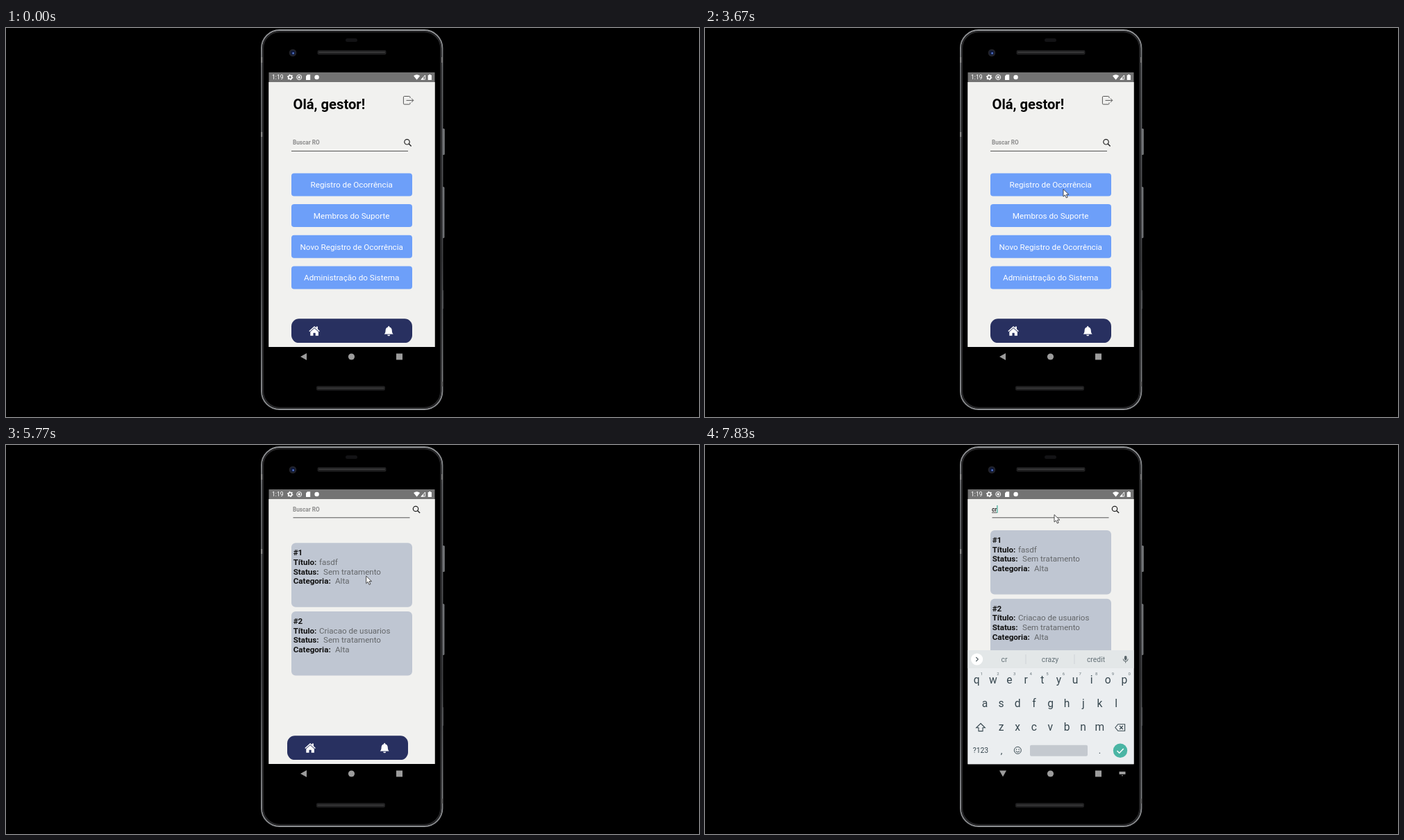
These frames come from a looping animation (998 px wide and 561 px high, 8000 ms). An HTML page:

```html
<!DOCTYPE html>
<html lang="pt">
<head>
<meta charset="utf-8">
<title>App</title>
<style>
html, body { margin: 0; width: 100%; height: 100%; overflow: hidden; background: #000; }
svg { display: block; width: 100%; height: 100%; font-family: Roboto, sans-serif; }
</style>
</head>
<body>
<svg id="stage" viewBox="0 0 998 561"></svg>
<script>
const LOOP = 8000;
const stage = document.getElementById('stage');

const rect = (x, y, w, h, fill, r = 0, more = '') =>
  `<rect x="${x}" y="${y}" width="${w}" height="${h}" rx="${r}" fill="${fill}" ${more}/>`;
const circle = (x, y, r, fill, more = '') => `<circle cx="${x}" cy="${y}" r="${r}" fill="${fill}" ${more}/>`;
const path = (d, fill, more = '') => `<path d="${d}" fill="${fill}" ${more}/>`;
const line = (d, color, w = 1, more = '') =>
  `<path d="${d}" fill="none" stroke="${color}" stroke-width="${w}" ${more}/>`;
const text = (x, y, size, fill, s, more = '') =>
  `<text x="${x}" y="${y}" font-size="${size}" fill="${fill}" ${more}>${s}</text>`;
const group = (id, body, more = '') => `<g id="${id}" ${more}>${body}</g>`;
const MID = 'text-anchor="middle"';
const BOLD = 'font-weight="700"';

const search = (x, y) => circle(x - 1, y - 1, 3.7, 'none', 'stroke="#222" stroke-width="1.2"') +
  line(`M${x + 1.7} ${y + 1.7}l3.4 3.4`, '#222', 1.4);

const tabBar = x => rect(x, 419.3, 174, 34.8, '#283060', 11) +
  path(`M${x + 25.3} 437l7.8-7 2.6 2.3v-1.7h2.2v3.7l3 2.7-1 1-6.8-6-6.8 6z
    M${x + 27.3} 438.2l5.8-5.1 5.8 5.1v5.6h-4.2v-4.1h-3.2v4.1h-4.2z`, '#fff') +
  path(`M${x + 133.7} 441.5c1.8-1.8 1.7-3.2 1.9-5.6 .2-2.6 1.7-4.2 3.7-4.6v-.7a.9.9 0 0 1 1.8 0v.7
    c2 .4 3.5 2 3.7 4.6 .2 2.4 .1 3.8 1.9 5.6zM${x + 138.2} 442.5h4a2 1.8 0 0 1-4 0z`, '#fff');

const speaker = (x, y) => rect(x, y, 99, 6.4, '#1f1f20', 2) + rect(x + 1.5, y + 2.1, 96, 2, '#363637', 1);

function phone() {
  return rect(628, 145, 3.8, 38, '#77797c', 1.5) + rect(628, 229, 3.4, 74, '#77797c', 1.5) +
    rect(627.5, 378, 2.6, 27, '#3a3b3d', 1) +
    rect(368, 3, 260.4, 547, '#000', 26, 'stroke="url(#rim)" stroke-width="2"') +
    rect(370.2, 5.2, 256, 542.6, 'none', 24, 'stroke="#28282a" stroke-width="2"') +
    rect(367, 42, 2.2, 8, '#888') + rect(367, 150, 2.2, 7, '#888') +
    rect(627, 42, 2, 8, '#777') + rect(627, 510, 2, 7, '#555') +
    rect(489, 15, 17, 5, '#131315', 2.5) + speaker(448.5, 32) + speaker(447, 516.3) +
    circle(413, 35.7, 5.3, '#22232a') + circle(413, 35.7, 3.2, '#101a3c') + circle(413.6, 36.4, 1.3, '#5577d0');
}

function statusBar() {
  return rect(378.5, 64, 239, 14, '#737373') +
    text(383, 74.2, 8.6, '#fff', '1:19') +
    circle(409.2, 71, 2.5, 'none', 'stroke="#fff" stroke-width="1.7"') +
    circle(409.2, 71, 3.7, 'none', 'stroke="#fff" stroke-width="1.1" stroke-dasharray="1.6 2.27"') +
    circle(422.2, 71, 3.5, 'none', 'stroke="#fff" stroke-width="1"') + circle(422.2, 71, 1.7, '#fff') +
    path('M432 69.3l2-2h4.2v7.6H432z', '#fff') + circle(447.6, 71, 3.2, '#fff') +
    path('M587 69q4.6-3.6 9.2 0l-4.6 5.7z', '#fff') +
    line('M597.8 74.2h5.8v-6.2z', '#fff', .9) + path('M597.6 74.4l3.8-4v4z', '#fff') +
    path('M607.7 68h1.4v-.9h2.4v.9h1.4v6.9h-5.2z', '#fff');
}

function home() {
  const labels = ['Registro de Ocorrência', 'Membros do Suporte', 'Novo Registro de Ocorrência', 'Administração do Sistema'];
  return rect(378, 78, 240, 382, '#f1f1ef') +
    text(413.5, 117, 20.2, '#050505', 'Olá, gestor!', BOLD) +
    line('M582 101v-1.2q0-1.3-1.3-1.3h-7q-1.3 0-1.3 1.3v9q0 1.3 1.3 1.3h7q1.3 0 1.3-1.3v-1.2M576.5 104.4h10M584 101.6l2.8 2.8-2.8 2.8', '#555', 1) +
    text(413, 168, 8.2, '#8c8c8c', 'Buscar RO', BOLD) + search(578.5, 165.3) +
    line('M411 177.5h168', '#555') +
    labels.map((s, i) => group('btn' + i, rect(411, 209.4 + i * 44.7, 174, 33, '#6d9ff9', 4) +
      text(497.7, 230.2 + i * 44.7, 11.7, '#fff', s, MID))).join('') +
    tabBar(411);
}

function card(y, id, title) {
  const rows = [['Título:', title, 451], ['Status:', 'Sem tratamento', 457], ['Categoria:', 'Alta', 474]];
  return rect(411, y, 174, 92.5, '#bfc6d2', 6) +
    text(413.7, y + 18, 11.6, '#111', id, BOLD) +
    rows.map(([k, v, x], i) => text(413.7, y + 31.7 + i * 13.7, 11.6, '#111', k, BOLD) +
      text(x, y + 31.7 + i * 13.7, 11.6, '#636669', v)).join('');
}

function list() {
  return rect(378, 78, 240, 382, '#f1f1ef') +
    group('hint', text(413, 95.8, 8.2, '#8c8c8c', 'Buscar RO', BOLD)) +
    text(413, 95.8, 8.2, '#333', '', `${BOLD} id="typed"`) +
    rect(413, 97.3, 8, .8, '#333', 0, 'id="under"') +
    rect(413, 87, 1, 11, '#1a9c86', 0, 'id="caret"') +
    search(591, 93) + line('M413.5 104.8h168', '#555') +
    group('cards', card(141.2, '#1', 'fasdf') + card(240, '#2', 'Criacao de usuarios')) +
    group('listTabs', tabBar(405));
}

function keyboard() {
  const ink = '#37474f', step = 23.63;
  const rows = [['qwertyuiop', 391.2, 344], ['asdfghjkl', 403, 378], ['zxcvbnm', 426.5, 412]];
  const keys = upper => rows.map(([s, x, y]) => [...s].map((c, i) =>
    text(x + i * step, y, 15.6, ink, upper ? c.toUpperCase() : c, MID)).join('')).join('');
  const digits = [...'1234567890'].map((d, i) => text(398.4 + i * step, 332, 6, '#68757b', d, MID)).join('');
  const arrow = 'M397 401.5l6.3 6.3h-3.3v4.8h-6v-4.8h-3.3z';
  const words = [431, 497, 563].map((x, i) => text(x, 313, 10.4, '#647177', '', `${MID} id="word${i}"`)).join('');
  return rect(378, 296, 240, 164.5, '#ebeef0') + rect(378, 296, 240, 26, '#e3e7e8') +
    circle(391.6, 309, 8.6, '#fff') + line('M390.3 306l3 3-3 3', '#5a666b', 1.2) +
    group('words', words + line('M462 302v14M532 302v14', '#cbd0d3', .8)) +
    rect(603.9, 304, 3.6, 6.4, '#5a666b', 1.8) + line('M602.2 308.5a3.5 3.5 0 0 0 7 0M605.7 312v2.4', '#5a666b', 1) +
    digits + group('upper', keys(true) + path(arrow, ink)) +
    group('lower', keys(false) + line(arrow, ink, 1.1)) +
    line('M590.8 407.5l4-4.8h9.8v9.6h-9.8zM597 405l5 5m0-5l-5 5', ink, 1.1) +
    text(397, 444.3, 10.4, ink, '?123', MID) + text(427, 445, 13, ink, ',', MID) + text(568.5, 445, 13, ink, '.', MID) +
    circle(450.3, 440.3, 5, 'none', `stroke="${ink}" stroke-width="1"`) +
    circle(448.5, 439, .8, ink) + circle(452.1, 439, .8, ink) + line('M447.5 441.5q2.8 3 5.6 0', ink, 1) +
    rect(468, 432.7, 83, 16, '#c4c9cf', 2) +
    circle(598, 440.8, 10.2, '#4ab5a4') + line('M593.5 441l3.2 3.2 6-6.2', '#fff', 1.5);
}

function navIcons() {
  const c = 'inherit';
  return group('nav', group('back', path('M424 474l9-5v10z', c)) + group('hide', path('M424 469.5h10l-5 9z', c)) +
    circle(497.5, 474, 4.6, c) + rect(562, 469.5, 9, 9, c) +
    group('kbIcon', rect(596.5, 471, 9, 4, c, .5) + path('M599.5 476.2h3l-1.5 1.5z', c)));
}

stage.innerHTML = `<defs>
  <linearGradient id="rim" x1="0" y1="0" x2="0" y2="1">
    <stop offset="0" stop-color="#97999c"/><stop offset=".1" stop-color="#66686b"/>
    <stop offset=".6" stop-color="#434447"/><stop offset="1" stop-color="#8c8e91"/>
  </linearGradient>
  <clipPath id="view"><rect x="378.5" y="78" width="239" height="382" id="viewRect"/></clipPath>
  <clipPath id="full"><rect x="378.5" y="78" width="239" height="410"/></clipPath></defs>` +
  rect(0, 0, 998, 561, '#000') + phone() +
  rect(378.5, 78, 239, 382, '#f9f9f9') +
  `<g clip-path="url(#view)">${group('home', home())}${group('list', list())}</g>` +
  statusBar() +
  `<g clip-path="url(#full)">${group('keyboard', keyboard())}${rect(378, 460, 240, 28, '#000', 0, 'opacity=".2"')}</g>` +
  navIcons() +
  group('cursor', path('M0 0v10.6l2.5-2.3 1.8 4.1 1.9-.8-1.8-4h3.4z', '#fff', 'stroke="#222" stroke-width=".8"'));

const el = {};
stage.querySelectorAll('[id]').forEach(n => el[n.id] = n);

const clamp = v => Math.min(1, Math.max(0, v));
const span = (t, a, b) => clamp((t - a) / (b - a));
const set = (n, k, v) => el[n].setAttribute(k, v);
const show = (n, on) => set(n, 'display', on ? 'inline' : 'none');
const zoom = s => `translate(498 268) scale(${s}) translate(-498 -268)`;

// time, x, y of the pointer tip
const track = [[400, 640, 318], [970, 566, 254], [1530, 545, 234], [1770, 545, 234], [2230, 538, 231],
  [2530, 526, 235], [2600, 526, 235], [2930, 516, 232.5], [4700, 516, 232.5], [5430, 522, 152], [5530, 521.5, 151.5],
  [5670, 521.5, 151.5], [5770, 518.7, 189], [5920, 517, 212], [6470, 503.5, 101], [6530, 503, 100.5], [LOOP, 503, 100.5]];

function pointer(t) {
  const i = Math.max(1, track.findIndex(p => p[0] > t));
  const [a, b] = [track[i - 1], track[i]];
  const u = span(t, a[0], b[0]), e = u * u * (3 - 2 * u);
  return [a[1] + (b[1] - a[1]) * e, a[2] + (b[2] - a[2]) * e];
}

function draw(t) {
  show('cursor', t >= track[0][0]);
  set('cursor', 'transform', `translate(${pointer(t)})`);

  // press, then the list fades in over the growing home screen
  set('btn0', 'opacity', 1 - .15 * span(t, 3680, 3730));
  const grow = 1 - (1 - span(t, 3870, 4270)) ** 4;
  const fade = span(t, 3880, 4320);
  set('home', 'transform', zoom(1 + .15 * grow));
  set('list', 'transform', zoom(.85 + .15 * grow));
  set('list', 'opacity', fade);
  show('home', fade < 1);
  show('list', fade > 0);

  // keyboard slides up while it fades in
  const open = t >= 6840, rise = span(t, 6840, 7030);
  const slide = 62 * (1 - rise);
  show('keyboard', open);
  set('keyboard', 'transform', `translate(0 ${slide})`);
  set('keyboard', 'opacity', clamp(.4 + rise * .6));
  set('viewRect', 'height', open ? 218 : 382);
  show('listTabs', !open);
  set('cards', 'transform', `translate(0 ${t >= 7000 ? -18.2 : 0})`);
  set('nav', 'fill', open && rise < 1 ? '#dcdcdc' : '#9c9c9c');
  show('back', t < 7000);
  show('hide', t >= 7000);
  show('kbIcon', open);
  set('kbIcon', 'opacity', rise);

  // typing
  const typed = 'cr'.slice(0, (t >= 7370) + (t >= 7560));
  const n = typed.length;
  const words = [['', '', ''], ['c', 'can', 'call'], ['cr', 'crazy', 'credit']][n];
  const width = [0, 4.3, 7.4][n];
  el.typed.textContent = typed;
  words.forEach((w, i) => el['word' + i].textContent = w);
  show('hint', !n);
  show('words', n);
  show('upper', !n);
  show('lower', n);
  set('under', 'width', width);
  show('caret', t >= 6730);
  set('caret', 'x', 413 + width);
}

function tick() {
  draw(performance.now() % LOOP);
  requestAnimationFrame(tick);
}
tick();
</script>
</body>
</html>
```
